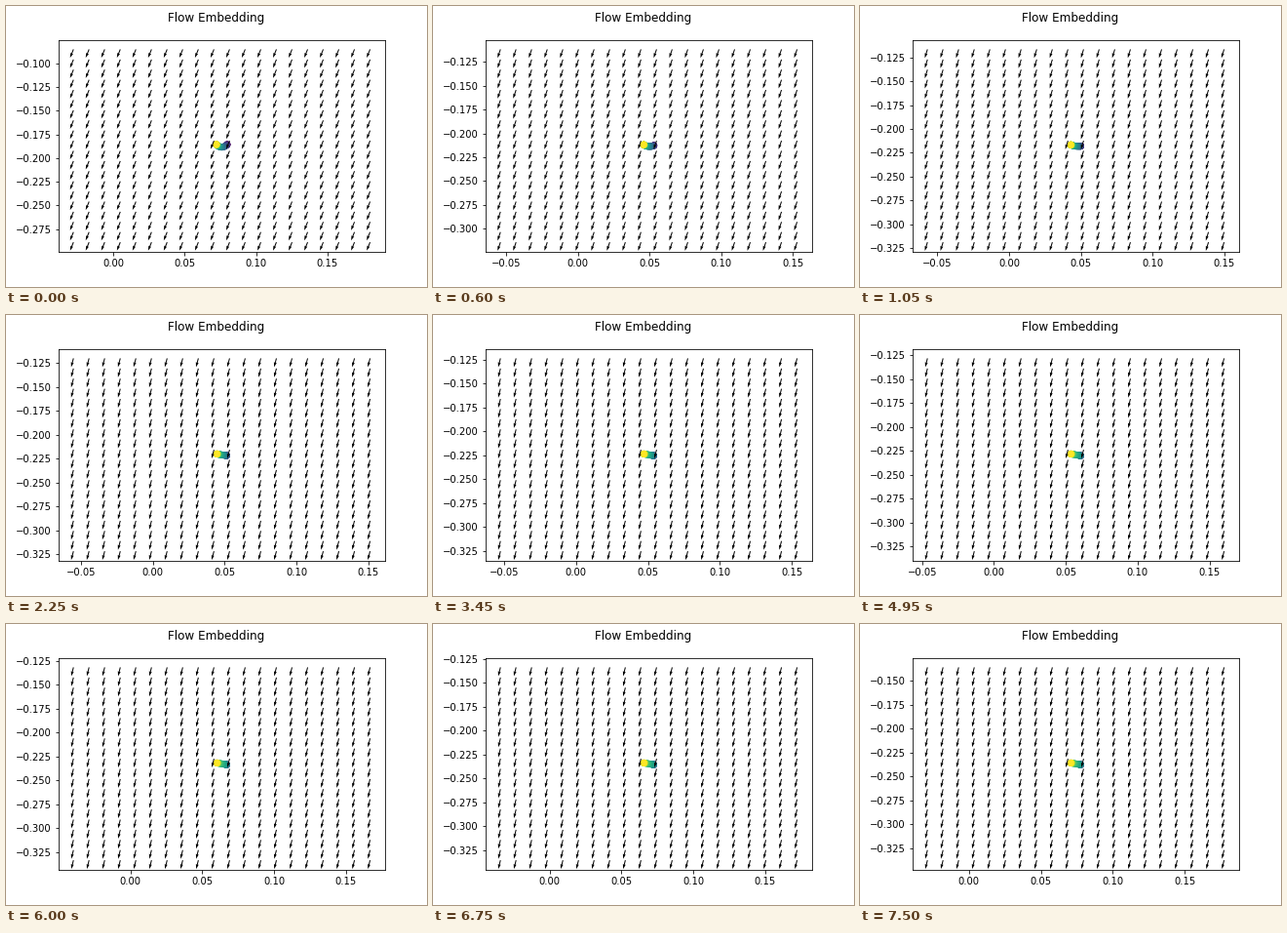
Animation, 432 px wide and 288 px high, one loop 7650 ms. Source, as a matplotlib script:

```python
import matplotlib.pyplot as plt
import numpy as np
from matplotlib.animation import FuncAnimation
from matplotlib.ticker import MultipleLocator

FRAMES, INTERVAL = 51, 150
START = np.array([0.0760, -0.1871])
DECAY = 0.53

# Slow drift of the embedding centre: step, x, y
DRIFT = np.array([
    [6, 0.0458, -0.2183],
    [14, 0.0479, -0.2212],
    [22, 0.0506, -0.2243],
    [32, 0.0569, -0.2294],
    [39, 0.0636, -0.2324],
    [49, 0.0743, -0.2368],
])
COEFFS = np.polyfit(DRIFT[:, 0] / 49, DRIFT[:, 1:], 4)

labels = np.linspace(0, 1, 40)

plt.rcParams["font.family"] = "DejaVu Sans"
fig = plt.figure(figsize=(6, 4), dpi=72)
fig.subplots_adjust(left=0.125, right=0.9, bottom=0.125, top=0.88)
ax = fig.add_subplot(111)
fig.suptitle("Flow Embedding")


def drift(step):
    return np.array([np.polyval(c, step / 49) for c in COEFFS.T])


def center(step):
    return drift(step) + (START - drift(0)) * DECAY**step


def blend(start, end, weight):
    return end + (start - end) * weight


def points(step):
    """Curve of embedded points, relaxing from an arc into a short bar."""
    peak = 0.45 * (1 - 0.95**step)
    along = np.clip((labels - peak) / (1 - peak), 0, 1)
    c = np.cos(np.pi * along**0.7)
    c = np.tanh(1.4 * c) / np.tanh(1.4)
    w = 0.8**step
    x = blend(0.0038, 0.0033, w) * c
    y = blend(0.0014 * (2 * c**2 - 1), -0.0009 * c, w)
    return x, y, np.array([blend(0.1038, 0.1032, w), blend(0.10175, 0.1009, w)])


def update(frame):
    step = max(frame - 1, 0)
    mid = center(step)
    px, py, half = points(step)
    gx, gy = np.meshgrid(*(np.linspace(m - h, m + h, 20) for m, h in zip(mid, half)))
    tilt = np.radians(14 + 8 * 0.85**step)

    ax.clear()
    ax.scatter(mid[0] + px, mid[1] + py, c=labels, cmap="viridis")
    ax.quiver(gx, gy, np.full_like(gx, -np.sin(tilt)), np.full_like(gy, -np.cos(tilt)))
    ax.set_xlim(mid[0] - 1.1 * half[0], mid[0] + 1.1 * half[0])
    ax.set_ylim(mid[1] - 1.1 * half[1], mid[1] + 1.1 * half[1])
    ax.xaxis.set_major_locator(MultipleLocator(0.05))
    ax.yaxis.set_major_locator(MultipleLocator(0.025))
    return []


anim = FuncAnimation(fig, update, frames=FRAMES, interval=INTERVAL,
                     init_func=lambda: update(0), repeat=True, repeat_delay=0)
plt.show()
```
